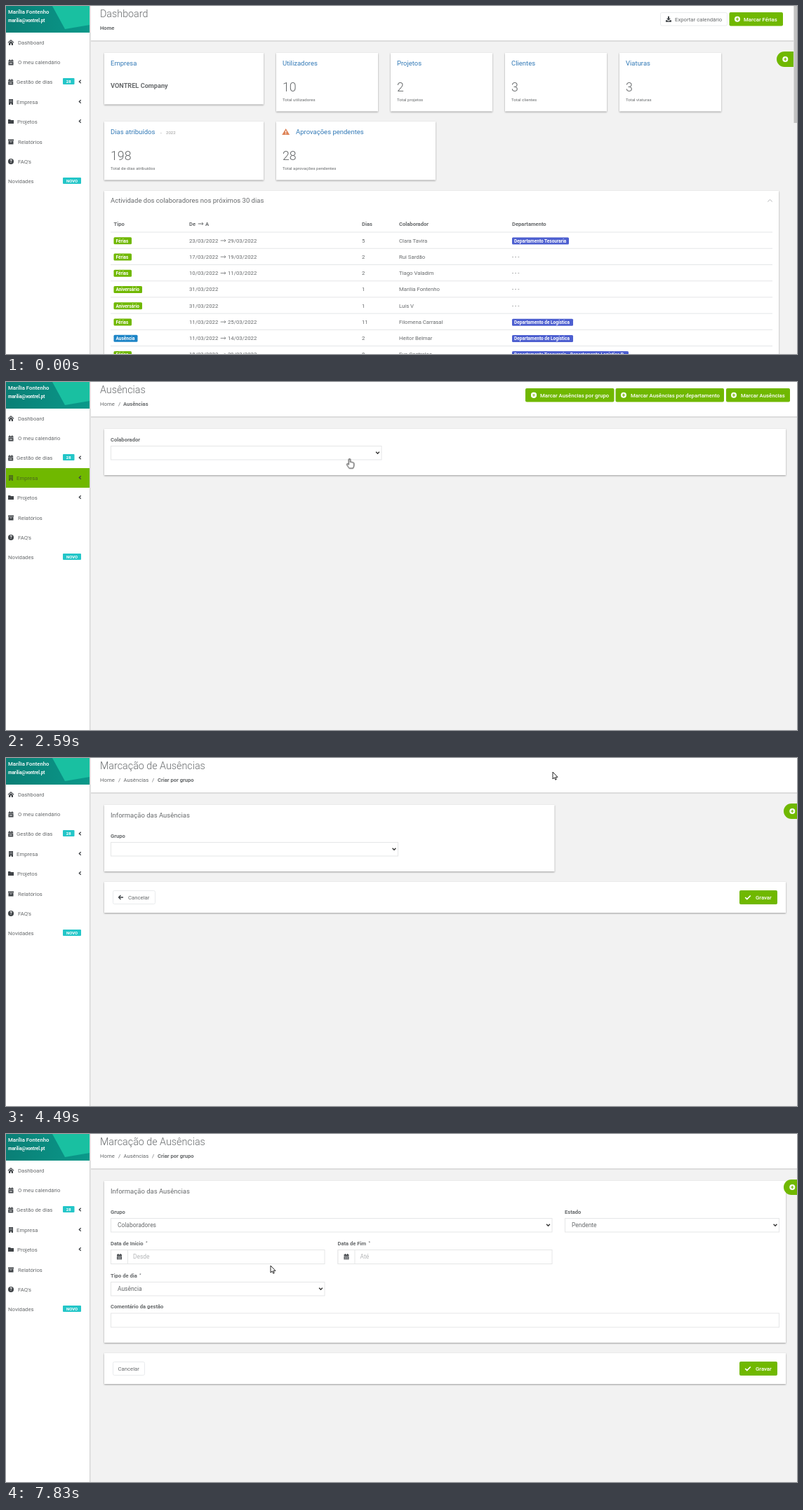
Write an HTML page that moves like this. It is 1127 px wide and 497 px high and loops after 8 s.

```html
<!DOCTYPE html>
<html lang="pt">
<head>
<meta charset="utf-8">
<title>Gestão de ausências</title>
<style>
html, body { margin: 0; width: 100%; height: 100%; overflow: hidden; background: #f2f2f2; }
svg { display: block; width: 100%; height: 100%; font-family: Roboto, "Noto Sans", sans-serif; }
text { white-space: pre; }
.card { filter: drop-shadow(0 1px 1px rgba(0, 0, 0, .36)); }
.timed { animation: 8s step-end infinite; }
#lower { animation: lower 8s step-end infinite; }
#glow { animation: glow 8s linear infinite; }
#cursor { animation: cursor 8s linear infinite; }
@keyframes lower {
  0% { transform: translateY(0); }
  13.375% { transform: translateY(0); animation-timing-function: ease-out; }
  16.5% { transform: translateY(126px); }
  29.375% { transform: translateY(0); }
  35% { transform: translateY(126px); }
  52.5%, 100% { transform: translateY(0); }
}
@keyframes glow {
  0%, 38.25% { opacity: 0; }
  42.25%, 100% { opacity: 1; }
}
</style>
</head>
<body>
<svg id="stage" viewBox="0 0 1127 497" preserveAspectRatio="none"></svg>
<script>
const LOOP = 8000;
const GREEN = '#70b800', LIME = '#a9ff1c', TEAL = '#23c6c8', INK = '#676a6c', DARK = '#3f4347', LINE = '#e5e6e7';
const pct = ms => ms / LOOP * 100 + '%';
let css = '', count = 0;

// Shows content only within the given [from, to] spans of the loop
function show(body, ...spans) {
  const name = 'show' + count++;
  const keys = spans.map(([a, b]) => `${pct(a)}{visibility:visible}${pct(b)}{visibility:hidden}`).join('');
  css += `@keyframes ${name}{0%{visibility:hidden}${keys}}`;
  return `<g class="timed" style="animation-name:${name}">${body}</g>`;
}

// Text styles
const BOLD = { z: 7.6, w: 700 }, BTN = { w: 500, c: '#fff' }, HEAD = { z: 9.5 }, LINK = { z: 9.5, c: '#337ab7' };
const SMALL = { z: 6.1 }, BIG = { z: 17.8, w: 300 }, TITLE = { z: 14.3, w: 300 }, VALUE = { z: 8.45 };
const HINT = { z: 8.45, c: '#b4b6b8' };

// y is the middle of the capitals
const text = (x, y, s, { z = 7.75, w = 400, c = INK, a = 'start' } = {}) =>
  `<text x="${x}" y="${y + z * .355}" font-size="${z}" font-weight="${w}" fill="${c}" text-anchor="${a}">${s}</text>`;
const box = (x, y, x2, y2, fill, more = '') =>
  `<rect x="${x}" y="${y}" width="${x2 - x}" height="${y2 - y}" fill="${fill}" ${more}/>`;
const frame = (x, y, x2, y2, stroke = LINE, fill = '#fff', r = 0) =>
  box(x + .5, y + .5, x2 - .5, y2 - .5, fill, `stroke="${stroke}" rx="${r}"`);
const card = (x, y, x2, y2) => box(x, y, x2, y2, '#fff', 'class="card"');
const path = (d, more) => `<path d="${d}" ${more}/>`;

const CAL = 'M-3.5-3h1.2v-1.2h1.2V-3h2.2v-1.2h1.2V-3h1.2v2h-7zM-3.5-.5h7V4h-7z';
const DISC = 'M-4 0a4 4 0 1 1 8 0a4 4 0 1 1-8 0z';
const SOLID = {
  home: 'M-4.5 0 0-4 4.5 0 3.8.7 0-2.6-3.8.7zM-3 .9 0-1.7 3 .9V4H.8V1.4H-.8V4H-3z',
  cal: CAL + 'M-2 1h4v.9h-4z',
  day: CAL + 'M-2.2.6h2v2h-2z',
  grid: CAL + 'M-2.4.4h1.2v1h-1.2zM-.6.4h1.2v1h-1.2zM1.2.4h1.2v1h-1.2zM-2.4 2.2h1.2v1h-1.2zM-.6 2.2h1.2v1h-1.2zM1.2 2.2h1.2v1h-1.2z',
  done: CAL + 'M-2 1.6l.7-.7.9.9L1.4.1l.7.7-2.5 2.4z',
  building: 'M-3-4H3V4H.8V2.2H-.8V4H-3zM-1.6-2.8h1v1h-1zM.6-2.8h1v1h-1zM-1.6-.8h1v1h-1zM.6-.8h1v1h-1z',
  folder: 'M-4-3H-1l1 1h4v5h-8z',
  archive: 'M-4-3.5h8v2h-8zM-3.5-1h7v4.5h-7zM-1.2-.2h2.4v.8h-2.4z',
  scales: 'M-4-3h8v.8H.4v5.4h2V4h-4.8v-.8h2v-5.4H-4zM-5 1l1.6-3.5L-1.8 1q-1.6 1.6-3.2 0zM1.8 1l1.6-3.5L5 1q-1.6 1.6-3.2 0z',
  disc: DISC,
  plus: DISC + 'M-.6-2.2H.6v1.6h1.6V.6H.6v1.6H-.6V.6h-1.6V-.6h1.6z',
  download: 'M-1-4h2v3h2L0 2-3-1h2zM-4 1.5h2L0 3l2-1.5h2V4h-8z',
  warn: 'M0-4.6 5.5 4.5h-11zM-.6-1.5H.6v3H-.6zM-.6 2.2H.6v1.2H-.6z',
  list: 'M-4-3h1.5v1.5H-4zM-4-.7h1.5V.8H-4zM-4 1.6h1.5v1.5H-4zM-1.5-2.8H4v1h-5.5zM-1.5-.5H4v1h-5.5zM-1.5 1.8H4v1h-5.5z',
  caret: 'M-2.3-1.2h4.6L0 1.5z'
};
const STROKED = {
  left: 'M1.2-2.3-1.2 0 1.2 2.3', down: 'M-2.4-1.2 0 1.2 2.4-1.2', up: 'M-3.2 1.6 0-1.6 3.2 1.6',
  prev: 'M1.5-3-1.5 0 1.5 3', next: 'M-1.5-3 1.5 0-1.5 3',
  back: 'M3.5 0H-3M0-3-3 0 0 3', to: 'M-3.8 0H3.5M1.7-1.8 3.5 0 1.7 1.8',
  check: 'M-3.8 0-1.2 2.5 3.8-2.5', search: 'M1.3 1.3 3.6 3.6M-3.3-.7a2.6 2.6 0 1 1 5.2 0a2.6 2.6 0 1 1-5.2 0'
};
const icon = (name, x, y, c = DARK, w = 1.3) => path(SOLID[name] || STROKED[name], `transform="translate(${x} ${y})" ` +
  (SOLID[name] ? `fill="${c}" fill-rule="evenodd"` : `fill="none" stroke="${c}" stroke-width="${w}"`));

const badge = (x, y, w, s, fill) =>
  box(x, y - 5, x + w, y + 5, fill, 'rx="1.5"') + text(x + 3, y, s, { z: 6.5, w: 700, c: '#fff' });
const tag = (x, x2, y, s) =>
  box(x, y - 4.5, x2, y + 4.5, TEAL, 'rx="1"') + text((x + x2) / 2, y, s, { z: 5.9, w: 700, c: '#fff', a: 'middle' });
const button = (x, y, x2, y2, tx, s, ic, ix, fill = GREEN) => box(x, y, x2, y2, fill, 'rx="2"') +
  (ic ? icon(ic, ix, (y + y2) / 2, '#fff', 1.7) : '') + text(tx, (y + y2) / 2, s, BTN);
const ghost = (x, y, x2, y2, tx, s, ic, ix) => frame(x, y, x2, y2, '#e9ebed', '#fff', 2) +
  (ic ? icon(ic, ix, (y + y2) / 2) : '') + text(tx, (y + y2) / 2, s);
const select = (x, y, x2, value = '', stroke = LINE) =>
  frame(x, y, x2, y + 20.5, stroke) + icon('down', x2 - 6, y + 10, '#333', 1.4) + text(x + 10, y + 10, value, VALUE);
const dateField = (x, y, x2, hint) => frame(x, y, x2, y + 21) + frame(x, y, x + 25, y + 21) +
  icon('grid', x + 12.5, y + 10.3) + text(x + 32, y + 10, hint, HINT);
const label = (x, y, s) => text(x, y, s, BOLD);
const required = (x, y, s, star) => label(x, y, s) + text(star, y - 1, '*', { z: 6 });

const fab = x => path(`M${x + 24} 65H${x + 11}a11 11 0 0 0 0 22H${x + 24}z`, `fill="${GREEN}"`) + icon('plus', x + 12.3, 76, '#fff');
const scrollbar = y => box(1122, 0, 1127, 497, '#f1f1f1') + box(1122.5, 0, 1127, y, '#c1c1c1');
const header = (title, crumbs) => box(120, 49, 1127, 51, '#dcdcdc') + box(120, 0, 1127, 49, '#fff') +
  text(134, 11, title, TITLE) + crumbs;
const crumb = (x, s) => text(x, 31, s), here = (x, s) => label(x, 31, s);

function dashboard() {
  const rows = [
    ['Férias', '23/03/2022', '29/03/2022', 5, 'Clara Tavira', 'Departamento Tesouraria', 81],
    ['Férias', '17/03/2022', '19/03/2022', 2, 'Rui Sardão'],
    ['Férias', '10/03/2022', '11/03/2022', 2, 'Tiago Valadim'],
    ['Aniversário', '31/03/2022', '', 1, 'Marília Fontenho'],
    ['Aniversário', '31/03/2022', '', 1, 'Luís V'],
    ['Férias', '11/03/2022', '25/03/2022', 11, 'Filomena Carrasal', 'Departamento de Logística', 87],
    ['Ausência', '11/03/2022', '14/03/2022', 2, 'Heitor Belmar', 'Departamento de Logística', 87],
    ['Férias', '18/03/2022', '29/03/2022', 8, 'Eva Castrelos', 'Departamento Tesouraria - Departamento Logística P', 166]
  ];
  const kinds = { 'Férias': [25.5, GREEN], 'Aniversário': [40.5, GREEN], 'Ausência': [34, '#1c84c6'] };
  const row = ([kind, from, to, days, who, dept, w], i) => {
    const y = 335 + i * 23.23, [kw, kc] = kinds[kind];
    return box(149, y - 12.5, 1092, y - 11.5, '#e4e6e8') + badge(153.5, y + .3, kw, kind, kc) + text(261, y, from) +
      (to ? icon('to', 309.5, y, INK, .8) + text(316, y, to) : '') + text(507, y, days) + text(560, y, who) +
      (dept ? badge(721, y + .5, w, dept, '#4d5fd0') : text(721, y, '- - -'));
  };
  const stat = (x, x2, name, value, note, y = 67) => card(x, y, x2, y + 83.5) + text(x + 9, y + 15, name, LINK) +
    text(x + 9, y + 49, value, BIG) + text(x + 9, y + 66.5, note, SMALL);
  const hover = i => box(149, 323.5 + i * 23.23, 1092, 345.7 + i * 23.23, '#f5f5f5');
  return header('Dashboard', here(134, 'Home')) +
    ghost(932, 9, 1028, 28.5, 953, 'Exportar calendário', 'download', 944) +
    button(1030.5, 9, 1107, 28.5, 1051, 'Marcar Férias', 'plus', 1042) +
    card(140, 67, 367, 140.5) + text(149, 82, 'Empresa', LINK) + text(149, 114, 'VONTREL Company', { z: 9.2, w: 700 }) +
    stat(385, 530, 'Utilizadores', 10, 'Total utilizadores') + stat(548, 693, 'Projetos', 2, 'Total projetos') +
    stat(711, 856, 'Clientes', 3, 'Total clientes') + stat(874, 1019, 'Viaturas', 3, 'Total viaturas') +
    stat(140, 367, 'Dias atribuídos', 198, 'Total de dias atribuídos', 165) +
    text(220, 181, '-', SMALL) + text(228, 181, '2022', { z: 6.1, c: '#999' }) +
    stat(385, 612, '', 28, 'Total aprovações pendentes', 165) +
    icon('warn', 398.7, 179.5, '#de8458') + text(413, 180, 'Aprovações pendentes', LINK) +
    card(140, 264, 1101, 510) + text(149, 278, 'Actividade dos colaboradores nos próximos 30 dias', HEAD) +
    icon('up', 1088.5, 278, '#b5b7b9', 1) +
    show(hover(1), [210, 350]) + show(hover(0), [350, 440]) +
    label(153.5, 311, 'Tipo') + label(261, 311, 'De') + icon('to', 277.5, 311, INK, 1) + label(284, 311, 'A') +
    label(507, 311, 'Dias') + label(560, 311, 'Colaborador') + label(721, 311, 'Departamento') +
    rows.map(row).join('') + fab(1098) + scrollbar(167);
}

const absenceHead = dx => header('Ausências', crumb(134, 'Home') + crumb(160, '/') + here(167, 'Ausências')) +
  `<g transform="translate(${dx})">` +
  button(740, 9, 866.5, 28.5, 761, '', 'plus', 752) +
  (dx ? box(740, 9, 866.5, 28.5, LIME, 'id="glow" rx="2"') : '') +
  icon('plus', 752, 18.75, '#fff') + text(761, 18.75, 'Marcar Ausências por grupo', BTN) +
  button(868.5, 9, 1023, 28.5, 890, 'Marcar Ausências por departamento', 'plus', 880) +
  button(1026, 9, 1117, 28.5, 1047, 'Marcar Ausências', 'plus', 1037) + '</g>';

const loading = () => absenceHead(0) + card(140, 67, 1111, 133) + label(149, 82, 'Colaborador') + select(149, 91, 535.5);

function calendar() {
  const col = i => 162 + i * 131, tops = [277, 364.5, 455];
  const days = ['seg.', 'ter.', 'qua.', 'qui.', 'sex.', 'sáb.', 'dom.'];
  const event = (x, x2, y, s) => box(x, y, x2, y + 15.5, GREEN, 'rx="1.5"') + text(x + 4.5, y + 7.3, s, { z: 6.55, w: 500, c: '#fff' });
  let s = box(col(0), 277, col(1), 364.5, '#efefef') + box(col(2), 364.5, col(3), 455, '#fffade');
  s += [262, ...tops].map(y => box(162, y, 1079, y + 1, '#dcdcdc')).join('');
  for (let i = 0; i < 8; i++) s += box(col(i), 262, col(i) + 1, 497, '#dcdcdc');
  s += days.map((d, i) => text(col(i) + 65.5, 270, d, { ...BOLD, a: 'middle' })).join('');
  for (let d = 1; d <= 20; d++) s += text(col(d % 7 || 7) + (d % 7 ? 128 : -3) - 0 + (d % 7 ? 0 : 0), tops[Math.floor(d / 7)] + 8.5, '', {});
  for (let d = 1; d <= 20; d++) s += text(col(d % 7) + 128, tops[Math.floor(d / 7)] + 8.5, d, { z: 8, a: 'end' });
  return s.replace(/<text[^>]*><\/text>/g, '') + event(687, 1079, 382.5, 'Heitor Belmar - Aprovado') +
    event(162, 291.5, 472.5, 'Heitor Belmar - Aprovado') + event(425.5, 684.5, 472.5, 'Rui Sardão - Aprovado');
}

const absences = () => absenceHead(-10) + card(140, 67, 1101, 168.5) +
  label(149, 82, 'Colaborador') + frame(149, 91, 531.5, 111) + icon('caret', 524.5, 101, '#777') +
  label(549, 82, 'Departamento') + select(549, 91, 771.5) + label(789, 82, 'Estado') + select(789, 91, 931.5) +
  label(149, 127, 'Referente a') + select(149, 136, 211) + label(229, 127, 'Data') +
  dateField(229, 135.5, 371, 'Desde') + dateField(389, 135.5, 531.5, 'Até') +
  button(955.5, 135, 1016.5, 155.5, 975, 'Pesquisar', 'search', 967) +
  button(1019, 135, 1092, 155.5, 1026, 'Limpar Pesquisa', '', 0, '#6c757d') +
  card(140, 183, 1101, 510) +
  path('M149.5 497V221.5H167M242.5 221.5H1091.5V497M166.5 222V194.5q0-2 2-2H240.5q2 0 2 2V222', 'fill="none" stroke="#e0e3e6"') +
  icon('grid', 185.5, 207) + text(192, 207, 'Calendário') + icon('list', 264.5, 207) + text(272, 207, 'Lista') +
  text(162, 242, 'março de 2022', { z: 13.6, w: 300 }) +
  box(900.5, 234.5, 1079, 250.5, '#2c3e50', 'rx="2"') + box(900.5, 234.5, 957, 250.5, '#1a252f', 'rx="2"') +
  text(906, 243, 'Vista de Mês', BTN) + text(962, 243, 'Vista de Semana', BTN) +
  icon('prev', 1039, 243, '#fff') + icon('next', 1066, 243, '#fff') +
  calendar() + fab(1098) + scrollbar(352);

const formHead = () => header('Marcação de Ausências', crumb(134, 'Home') + crumb(160, '/') + crumb(167.5, 'Ausências') +
  crumb(208, '/') + here(216, 'Criar por grupo'));
const formTitle = () => text(149, 82, 'Informação das Ausências', HEAD) + label(149, 111, 'Grupo');
const save = y => card(140, y, 1111, y + 44) + button(1045, y + 12, 1099, y + 32, 1068, 'Gravar', 'check', 1057);

function groupForm() {
  const option = (y, on, s) => (on ? box(150, y, 558, y + 17, '#1967d2') : '') + text(159, y + 8.5, s, { z: 8.45, c: on ? '#fff' : INK });
  const menu = on => frame(149, 141, 559, 177, '#8a8a8a') + option(142, !on, '') + option(159, on, 'Colaboradores');
  return formHead() + card(140, 67, 781.5, 162) + formTitle() + select(149, 120, 559) + save(177) +
    ghost(152, 189, 213, 209, 174, 'Cancelar', 'back', 163.5) +
    show(select(149, 120, 559, '', GREEN), [5110, 6150]) + show(select(149, 120, 559, 'Colaboradores', GREEN), [6150, 6610]) +
    show(menu(false), [5110, 5720]) + show(menu(true), [5720, 6150]) + show(fab(1108), [4330, 6610]);
}

const fullForm = () => formHead() + card(140, 67, 1111, 298) + formTitle() +
  select(149, 120, 778.5, 'Colaboradores') + label(796, 111, 'Estado') + select(796, 120, 1102, 'Pendente') +
  required(149, 156, 'Data de Início', 199) + dateField(149, 165, 454.5, 'Desde') +
  required(472.5, 156, 'Data de Fim', 516.5) + dateField(472.5, 165, 778.5, 'Até') +
  required(149, 202, 'Tipo de dia', 190) + select(149, 211, 454.5, 'Ausência') +
  label(149, 246.5, 'Comentário da gestão') + frame(149, 255.5, 1102, 276.5) +
  save(313) + ghost(152, 325, 198, 345, 159.5, 'Cancelar') + fab(1108);

function sidebar() {
  const item = (y, ic, tx, s, arrow, c = INK) => icon(ic, 7, y, c === INK ? DARK : c) +
    text(tx, y, s, { c }) + (arrow ? icon('left', 105.5, y - .5, DARK) : '');
  const HOT = '#4c6a1c';
  const days = (c, open, bg) => box(0, 95, 119, 123, bg) + icon('cal', open ? 8.7 : 6.7, 108.5, c === INK ? DARK : c) +
    text(open ? 17 : 15, 108.5, 'Gestão de dias', { c, w: open ? 500 : 400 }) +
    tag(open ? 80 : 81, open ? 96.5 : 97.5, 107.5, '28') + icon(open ? 'down' : 'left', 105.5, 108, DARK);
  const subs = [['cal', 'Férias'], ['home', 'Ausências'], ['home', 'Trabalho remoto'], ['done', 'Aprovações'], ['scales', 'Saldo de férias'], ['day', 'Feriados']];
  const pale = '#f8f8f9';
  return box(119, 0, 120, 497, '#d4d4d4') + box(120, 0, 121, 497, '#e9e9e9') + box(0, 0, 119, 497, '#fff') +
    '<linearGradient id="teal"><stop stop-color="#0a7f76"/><stop offset="1" stop-color="#0a998a"/></linearGradient>' +
    box(0, 0, 119, 38, 'url(#teal)') + path('M66 0H119V27L84 33z', 'fill="#19c0a1"') +
    text(3, 8, 'Marília Fontenho', { w: 500, c: '#fff' }) + text(3, 20.5, 'marilia@vontrel.pt', { z: 6.3, w: 700, c: '#fff' }) +
    item(52, 'home', 17, 'Dashboard') + item(80.5, 'cal', 17, 'O meu calendário') +
    box(0, 123, 119, 249, pale) + subs.map(([ic, s], i) => icon(ic, 25.5, 133 + i * 20) + text(36, 133 + i * 20, s)).join('') +
    show(tag(99, 115.5, 192, '28'), [1070, 2350]) + show(tag(97, 113, 192, '28'), [2800, 4200]) +
    show(days(INK, false, '#fff'), [0, 930], [2350, 2800], [4200, LOOP]) + show(days(HOT, false, GREEN), [930, 1070]) +
    show(days(HOT, true, GREEN), [1070, 1890]) + show(days(INK, true, pale), [1890, 2350], [2800, 4200]) +
    '<g id="lower">' + box(0, 123, 119, 497, '#fff') + item(137, 'building', 15, 'Empresa', true) +
    show(box(0, 123, 119, 151, GREEN) + item(137, 'building', 15, 'Empresa', true, HOT), [2350, 2800]) +
    item(165, 'folder', 16, 'Projetos', true) + item(194, 'archive', 17, 'Relatórios') +
    item(222, 'disc', 17, "FAQ's") + text(7, 222, '?', { z: 6.5, w: 700, c: '#fff', a: 'middle' }) +
    text(3, 250.5, 'Novidades') + tag(81, 107, 249.5, 'NOVO') + '</g>';
}

function cursor() {
  // time, x, y, steps to the next stop
  const stops = [
    [0, 600, 352, 1], [210, 600, 352, 3], [440, 470, 325, 3], [700, 240, 190, 3], [940, 95, 94, 1], [1010, 85, 99, 1],
    [1450, 85, 99, 3], [1700, 80, 108, 1], [1870, 76, 122, 1], [1950, 68, 152, 1], [2350, 68, 152, 3],
    [2590, 489.5, 109.5, 6], [3060, 794, 14, 1], [3610, 794, 14, 4], [3930, 791.5, 16, 1], [4490, 779, 20, 5],
    [4880, 430, 131, 1], [5110, 430, 131, 4], [5410, 428, 143, 1], [5560, 428, 143, 5], [5970, 416.5, 166, 1],
    [7030, 418, 170, 2], [7200, 452, 172, 3], [7410, 381, 187, 1], [7745, 373, 186, 1], [7830, 377, 188, 1], [LOOP, 377, 188, 1]
  ];
  css += '@keyframes cursor{' + stops.map(([t, x, y, n]) =>
    `${pct(t)}{transform:translate(${x}px,${y}px);animation-timing-function:steps(${n})}`).join('') + '}';
  const skin = 'fill="#fff" stroke="#111" stroke-width=".9" stroke-linejoin="round"';
  const arrow = path('M0 0V10L2.3 7.9 3.8 11.2 5.3 10.5 3.9 7.3H7z', skin);
  const hand = path('M-1.2.8Q0-.5 1.2.8V5Q2.3 4.3 3.2 5.2 4.2 4.7 5 5.7 6.2 5.4 6.3 6.8V10Q6 12 5 13.8H-.5Q-2.5 11-4 8.6-4.2 7-2.6 7.3L-1.2 8.6z', skin);
  const beam = path('M-2-5.5H2M0-5.5V5.5M-2 5.5H2', 'fill="none" stroke="#222" stroke-width=".9"');
  return '<g id="cursor">' + show(arrow, [210, 930], [2100, 2350], [4000, 7030], [7745, LOOP]) +
    show(hand, [930, 2100], [2350, 4000]) + show(beam, [7030, 7745]) + '</g>';
}

const scene = box(0, 0, 1127, 497, '#f2f2f2') +
  show(dashboard(), [0, 2350]) + show(loading(), [2350, 2800]) + show(absences(), [2800, 4200]) +
  show(groupForm(), [4200, 6610]) + show(fullForm(), [6610, LOOP]) + sidebar() + cursor();
document.getElementById('stage').innerHTML = `<style>${css}</style>` + scene;
</script>
</body>
</html>
```
